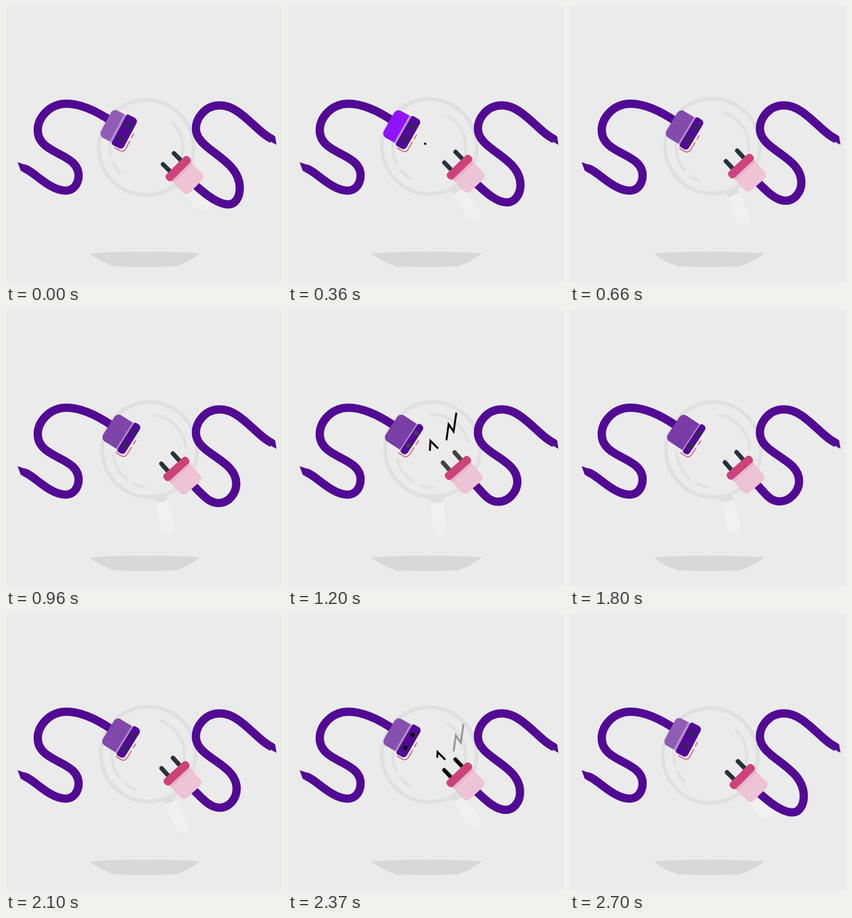
Write an HTML page with a canvas that moves like this. It is 500x500 px and loops after 2.73 s.

```html
<!DOCTYPE html>
<html lang="en">
<head>
<meta charset="utf-8">
<title>Plug and socket</title>
<style>
  html, body { margin: 0; width: 100%; height: 100%; overflow: hidden; background: #ebebeb; }
  canvas { display: block; width: 500px; height: 500px; }
</style>
</head>
<body>
<canvas id="stage" width="500" height="500"></canvas>
<script>
const ctx = document.getElementById('stage').getContext('2d');
const LOOP = 2730, STEP = 30, END = 2700;
const RAD = Math.PI / 180;
const CABLE = '#520a94';

const clamp = x => Math.max(0, Math.min(1, x));
const mix = (a, b, k) => a + (b - a) * k;
const mixRGB = (a, b, k) => `rgb(${a.map((v, i) => Math.round(mix(v, b[i], k)))})`;
// Linear rise to 1 at the peak, linear fall back to 0 at the end.
const swing = (t, peak) => t < peak ? t / peak : (END - t) / (END - peak);

const sparks = [
  { start: 350, x: -22, y: 0, metal: '#26323e' },
  { start: 1100, x: 0, y: 0, metal: '#424242' },
  { start: 2190, x: 13, y: 13, metal: '#000000' }
];
const SPARK_TIME = 250;
const BIG_BOLT = [[305, 186], [300, 220], [291, 207], [287, 236]];
const SMALL_BOLT = [[272, 251], [258, 237], [257, 255]];

function fillPath(d, color) {
  ctx.fillStyle = color;
  ctx.fill(new Path2D(d));
}

function strokePath(d, color, width, cap = 'butt') {
  ctx.strokeStyle = color;
  ctx.lineWidth = width;
  ctx.lineCap = cap;
  ctx.lineJoin = 'round';
  ctx.stroke(new Path2D(d));
}

function box(x, y, w, h, radius, color) {
  ctx.fillStyle = color;
  ctx.beginPath();
  ctx.roundRect(x, y, w, h, radius);
  ctx.fill();
}

function arc(x, y, r, from, to, color, width) {
  ctx.strokeStyle = color;
  ctx.lineWidth = width;
  ctx.lineCap = 'round';
  ctx.beginPath();
  ctx.arc(x, y, r, from * RAD, to * RAD);
  ctx.stroke();
}

function placed(x, y, degrees, draw) {
  ctx.save();
  ctx.translate(x, y);
  ctx.rotate(degrees * RAD);
  draw();
  ctx.restore();
}

function magnifier(p) {
  const turn = 45 * p * RAD, c = Math.cos(turn), s = Math.sin(turn);
  const x = 263.3 - 9.3 * c + 8.9 * s;
  const y = 265.4 - 9.3 * s - 8.9 * c;
  placed(x, y, 45 + 45 * p, () => {
    fillPath('M95 -11 L144 -12.5 A12.5 12.5 0 0 1 144 12.5 L95 11 Z', '#f0f0f0');
    fillPath('M87 -14 L97 -9 L97 9 L87 14 Z', '#dfdfdf');
  });
  arc(x, y, 86, 0, 360, '#e0e0e0', 7);

  const spin = -53 * p, gy = 256.5 - 1.5 * p;
  for (const [from, to] of [[-45, 32], [136, 154], [167, 214]])
    arc(x, gy, 66, from + spin, to + spin, '#e1e1e1', 5.5);
}

function leftCable() {
  fillPath('M21 283 L42 290 L37 302 L27 299 Z', CABLE);
  strokePath('M32 294 C48 297 78 334.5 108 334.5 C124 334.5 131.5 320 131.5 307 ' +
    'C131.5 265 57.5 270 57.5 225 C57.5 203 78 177 110 177 C137 177 165 191 193 210', CABLE, 15);
}

function rightCable(q) {
  const rx = 423.5 - 10.5 * q, ry = 330 - 25 * q;
  const bx = 403 - 29 * q, by = 359.5 - 16 * q;
  const ex = 338 - 5.5 * q, ey = 320 - 11 * q;
  fillPath('M490 251.5 L487.5 236 L474 229 L468 239 Z', CABLE);
  strokePath(`M482 241 C455 230 425 180 388 180 C358 180 344 206 344 222 ` +
    `C344 262 ${rx} ${275 - 9 * q} ${rx} ${ry} ` +
    `C${rx} ${ry + 18} ${mix(bx, rx, .55)} ${by} ${bx} ${by} ` +
    `C${bx - 20} ${by} ${ex + 18} ${ey + 17} ${ex} ${ey}`, CABLE, 15);
}

function socket(q, bright, metal) {
  const light = 27 + 15 * q, dark = 23 - 13 * q;
  const seam = 4.5 - 3 * q;
  placed(181 + 8.5 * q, 210 - .5 * q, 28 + 7 * q, () => {
    const body = bright ? '#9013fe' : mixRGB([145, 92, 179], [115, 52, 163], q);
    box(0, -28, light, 56, [9, 2, 2, 9], body);
    box(light - seam, -28, seam, 56, 1, '#b490cd');
    ctx.translate(light, 0);
    strokePath(`M${dark - 10} 32 H${dark - 4} Q${dark + 2} 32 ${dark + 2} 25 V16`, '#f7f0f5', 2);
    box(0, -31, dark, 62, [4, 7, 7, 4].map(r => Math.min(r, dark / 2)), CABLE);
    for (const v of [-13.5, 13.5]) {
      ctx.beginPath();
      ctx.arc(dark / 2, v, 4, 0, 7);
      ctx.fillStyle = metal;
      ctx.fill();
    }
    strokePath(`M${dark - 14} 34 H${dark - 4} Q${dark + 4.5} 34 ${dark + 4.5} 25 V11 ` +
      `M${dark + 4.5} 4 V-4`, '#d8668c', 2, 'round');
  });
}

function plug(q, metal) {
  placed(312 - 5.5 * q, 294.5 - 11 * q, 45 + 5 * q, () => {
    for (const v of [-14, 14]) {
      box(-29, v - 4, 26, 8, 4, metal === '#000000' ? '#666666' : metal);
      if (metal === '#000000') box(-28, v - 3, 25, 6, 3, metal);
    }
    box(4, -24.5, 41.5, 49, [2, 9, 9, 2], '#eec3d6');
    box(5, -24.5, 7.5, 49, 0, '#e8b3cb');
    box(-7.5, -28.5, 15, 57, 6, '#ce427b');
  });
}

// Draws the first part of a polyline, up to the given share of its length.
function bolt(points, share, alpha) {
  if (share <= 0 || alpha <= 0) return;
  const lengths = points.slice(1).map((b, i) => Math.hypot(b[0] - points[i][0], b[1] - points[i][1]));
  let left = share * lengths.reduce((a, b) => a + b);
  ctx.beginPath();
  ctx.moveTo(...points[0]);
  for (let i = 0; i < lengths.length && left > 0; i++) {
    const k = Math.min(1, left / lengths[i]);
    ctx.lineTo(mix(points[i][0], points[i + 1][0], k), mix(points[i][1], points[i + 1][1], k));
    left -= lengths[i];
  }
  ctx.globalAlpha = alpha;
  ctx.strokeStyle = '#0c0404';
  ctx.lineWidth = 3.5;
  ctx.lineCap = 'butt';
  ctx.lineJoin = 'miter';
  ctx.stroke();
  ctx.globalAlpha = 1;
}

function drawSpark(spark, e) {
  ctx.save();
  ctx.translate(spark.x, spark.y);
  bolt(SMALL_BOLT, Math.min(clamp(e / .35), clamp((1 - e) / .35)), 1);
  bolt(BIG_BOLT, clamp((e - .06) / .3), clamp(1 - (e - .45) / .42));
  ctx.restore();
}

function render(t) {
  const p = swing(t, 1350), q = swing(t, 1580);
  const spark = sparks.find(s => t >= s.start && t < s.start + SPARK_TIME);
  const metal = spark ? spark.metal : '#26323e';

  ctx.fillStyle = '#ebebeb';
  ctx.fillRect(0, 0, 500, 500);
  fillPath('M151 448.5 Q251 441 352 448.5 Q330 464 307 472 Q251 473.5 196 472 Q173 464 151 448.5 Z', '#d8d8d8');
  magnifier(p);
  leftCable();
  rightCable(q);
  socket(q, t >= 330 && t < 390, metal);
  plug(q, metal);
  if (spark) drawSpark(spark, (t - spark.start) / SPARK_TIME);
}

function tick() {
  const t = performance.now() % LOOP;
  render(Math.floor(t / STEP) * STEP);
  requestAnimationFrame(tick);
}
tick();
</script>
</body>
</html>
```
